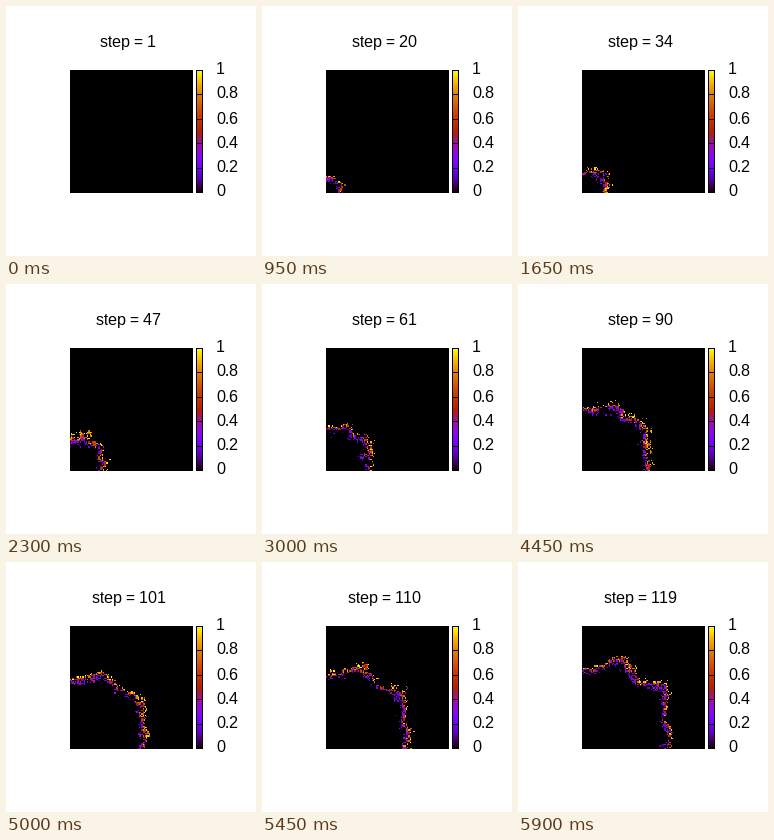
A matplotlib script for the animation above (5950 ms loop, 250 by 250 pixels).

```python
import numpy as np
import matplotlib.pyplot as plt
from matplotlib.animation import FuncAnimation
from matplotlib.patches import Rectangle

plt.rcParams["text.hinting"] = "native"
plt.rcParams["text.hinting_factor"] = 1

SIZE, DPI = 250, 100
STEPS = 119
N = 100                                  # cells per side
LEFT, TOP, RIGHT, BOTTOM = 64, 64, 187, 187
CELL = (RIGHT - LEFT) / N
SPEED = 0.74                             # pixels per step
PX = 72 / DPI                            # one pixel in points


def smooth(field, passes):
    for _ in range(passes):
        for axis in (0, 1):
            field = (np.roll(field, 1, axis) + field + np.roll(field, -1, axis)) / 3
    return field / field.std()


def arrival():
    """Step at which the lobed front, spreading from the corner, meets each cell."""
    y, x = (np.mgrid[:N, :N] + 0.5) * CELL
    angle, dist = np.arctan2(y, x), np.hypot(x, y)
    bulge = np.sin(2 * angle)
    lobes = bulge * np.cos(11 * (angle - np.radians(35)))
    shape = 0.88 + 0.06 * np.cos(angle) + 0.16 * bulge + 0.0008 * dist * lobes
    return 1 + dist / (SPEED * shape)


rng = np.random.default_rng(12)


def noise():
    return rng.normal(size=(N, N))


jitter = 1.8 * noise() + 2.4 * smooth(noise(), 4)
ignite = np.maximum(arrival() + jitter - 5.5, 2)
life = rng.uniform(8, 14, (N, N))
burns = rng.random((N, N)) < 0.66 + 0.14 * smooth(noise(), 2)


def heat(step):
    age = (step - ignite) / life
    value = np.clip(1 - age, 0, 1) ** 1.5
    return np.where(burns & (age >= 0) & (value > 0.1), value, 0)


fig = plt.figure(figsize=(SIZE / DPI, SIZE / DPI), dpi=DPI, facecolor="white")
ax = fig.add_axes([0, 0, 1, 1])
style = dict(cmap="gnuplot", vmin=0, vmax=1, interpolation="nearest", aspect="auto")
font = dict(family="Liberation Sans", size=16 * PX, color="black",
            ha="left", va="baseline")
line = dict(lw=PX, snap=False)

field = ax.imshow(np.zeros((N, N)), extent=(LEFT, RIGHT, BOTTOM, TOP), **style)

# Colour scale
ax.imshow(np.linspace(1, 0, 128)[:, None], extent=(190, 197, BOTTOM, TOP), **style)
ax.add_patch(Rectangle((190.5, 64.5), 6, 122, fill=False, ec="black", **line))
for i in range(6):
    y = 186.5 - round(24.4 * i)
    ax.plot([190.5, 196.5], [y, y], color="black", **line)
    ax.text(210, y + 4, f"{i / 5:g}", **font)

title = ax.text(0, 41, "", **font)
ax.set_xlim(0, SIZE)
ax.set_ylim(SIZE, 0)
ax.axis("off")


def draw(i):
    label = f"step = {i + 1}"
    field.set_data(heat(i + 1)[::-1])
    title.set_text(label)
    title.set_x(130 - 4.45 * len(label))
    return field, title


anim = FuncAnimation(fig, draw, frames=STEPS, interval=50, repeat=True,
                     repeat_delay=0, cache_frame_data=False)
plt.show()
```
